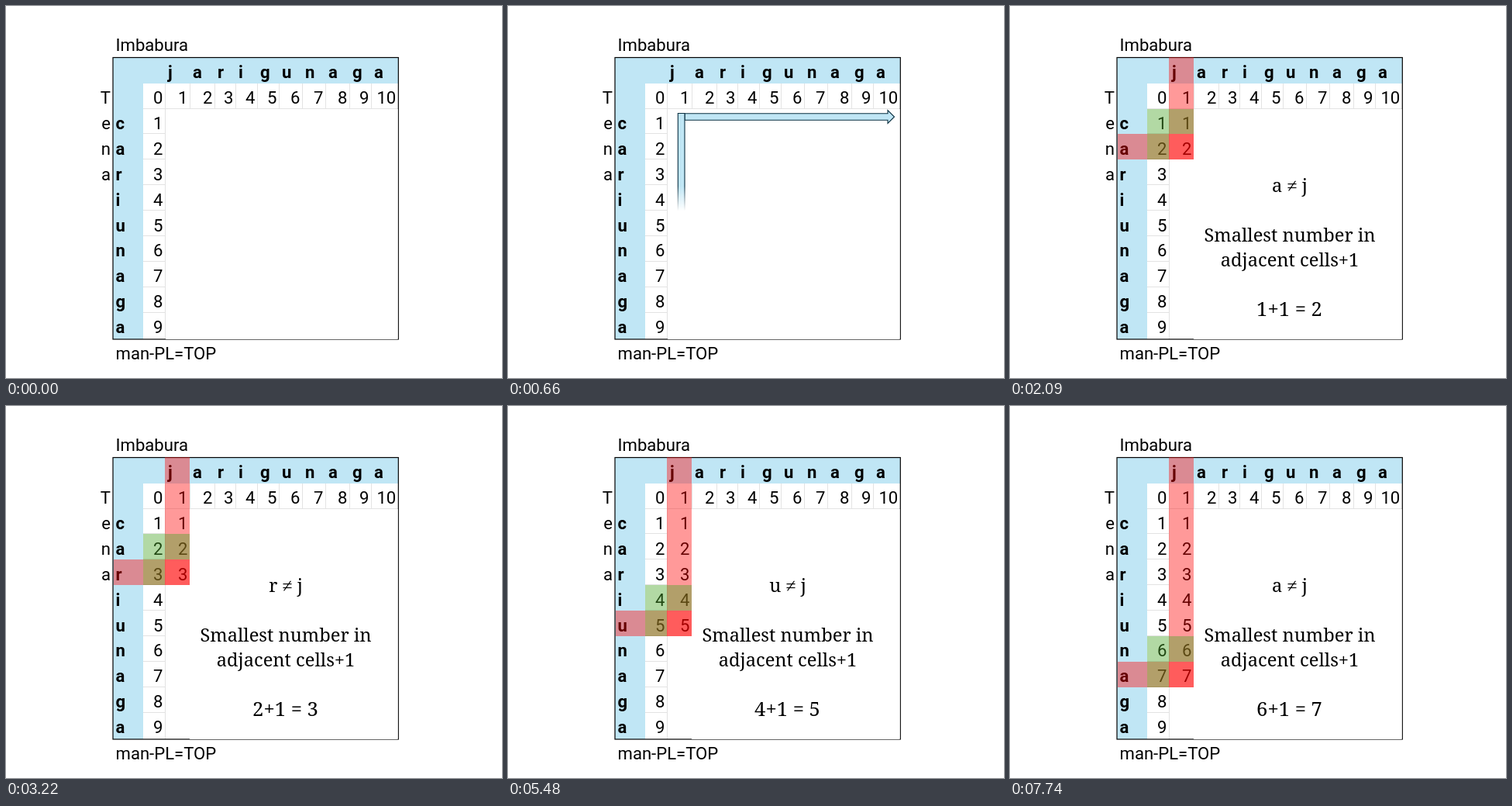
An HTML page that plays this animation: 640x480 px, repeating every 8 s.

```html
<!DOCTYPE html>
<html lang="en">
<head>
<meta charset="utf-8">
<title>Edit distance table</title>
<style>
  html, body { margin: 0; width: 100%; height: 100%; overflow: hidden; background: #fff; }
  svg { display: block; width: 640px; height: 480px; }
  text { font: 22.1px Roboto, sans-serif; fill: #000; white-space: pre; }
  .bold { font-weight: 700; }
  .end { text-anchor: end; }
  .note { font: 23.7px "Noto Serif", serif; text-anchor: middle; }
  .sum { font-size: 25.6px; }
  .sign { font-family: "Liberation Serif", serif; }
  .arrow { fill: #c0e6f5; stroke: #0b3041; stroke-width: 1.1; }
</style>
</head>
<body>
<svg id="stage" viewBox="0 0 640 480">
  <defs>
    <linearGradient id="fadeX" gradientUnits="userSpaceOnUse" y1="0" y2="0">
      <stop offset="0" stop-color="#fff"/><stop offset="1" stop-color="#fff" stop-opacity="0"/>
    </linearGradient>
    <linearGradient id="fadeY" gradientUnits="userSpaceOnUse" x1="0" x2="0">
      <stop offset="0" stop-color="#fff"/><stop offset="1" stop-color="#fff" stop-opacity="0"/>
    </linearGradient>
    <mask id="wipeX" maskUnits="userSpaceOnUse" x="0" y="0" width="640" height="480">
      <rect width="640" height="480" fill="url(#fadeX)"/>
    </mask>
    <mask id="wipeY" maskUnits="userSpaceOnUse" x="0" y="0" width="640" height="480">
      <rect width="640" height="480" fill="url(#fadeY)"/>
    </mask>
  </defs>
  <rect width="640" height="480" fill="#fff"/>
  <g id="table"></g>
  <path id="cover" fill="#fff"/>
  <g id="arrows">
    <path class="arrow" mask="url(#wipeX)" d="M228 138.7H490V134.5L498.5 143L490 151.5V147.2H228Z"/>
    <path class="arrow" mask="url(#wipeY)" d="M219.3 138.5H228V414.5H232.3L223.7 423L215 414.5H219.3Z"/>
  </g>
  <g id="lesson">
    <g id="values"></g>
    <path id="redCol" fill="#f00" fill-opacity=".4"/>
    <path id="redRow" fill="#f00" fill-opacity=".4"/>
    <path id="green" fill="#4ea72e" fill-opacity=".43"/>
    <text class="note" x="361" y="240"><tspan id="letter"></tspan> <tspan class="sign">≠</tspan> j</text>
    <text class="note" x="361" y="304">Smallest number in</text>
    <text class="note" x="361" y="336">adjacent cells+1</text>
    <text id="sum" class="note sum" x="360.5" y="400"></text>
  </g>
</svg>
<script>
const LOOP = 8000, STEP = 60, LESSON = 960, HOLD = 1130;
const SOFT = 32, WIPE = 7.4;
const across = "jarigunaga", down = "cariunaga", side = "Tena";
const cols = [177, 205, 237, 269, 296, 324, 352, 382, 412, 443, 471, 506];
const $ = id => document.getElementById(id);
const rowTop = r => Math.floor(100.15 + 32.9 * r);
const baseline = r => 126 + 32.9 * r;

function add(parent, tag, attrs, text) {
  const el = document.createElementNS("http://www.w3.org/2000/svg", tag);
  for (const key in attrs) el.setAttribute(key, attrs[key]);
  if (text !== undefined) el.textContent = text;
  $(parent).appendChild(el);
  return el;
}
const label = (parent, x, y, text, cls = "") => add(parent, "text", { x, y, class: cls }, text);

function buildTable() {
  add("table", "path", { d: "M138 66H506V100H177V430H138Z", fill: "#c0e6f5" });

  let grid = "M205.5 132V430M205 132.5H506";
  cols.slice(1, -1).forEach(x => grid += `M${x + .5} 100V132`);
  for (let r = 1; r < 10; r++) grid += `M177 ${rowTop(r) - .5}H205`;
  add("table", "path", { d: grid, stroke: "#e3e3e3", fill: "none" });
  add("table", "rect", { x: 138, y: 66.5, width: 368.3, height: 363.5, fill: "none", stroke: "#000", "stroke-width": 1.2 });

  label("table", 141.5, 58, "Imbabura");
  label("table", 141.5, 456, "man-PL=TOP");
  [...across].forEach((c, i) => label("table", cols[i + 1] + 4, 92.5, c, "bold"));
  [...down].forEach((c, i) => label("table", 141.5, baseline(i + 1), c, "bold"));
  [...side].forEach((c, i) => label("table", 135, baseline(i), c, "end"));
  for (let n = 0; n <= 10; n++) label("table", cols[n + 1] - 2.7, baseline(0), n, "end");
  for (let n = 1; n <= 9; n++) label("table", 202.3, baseline(n), n, "end");
}

function setWipe(id, axis, from, to, progress) {
  const p = Math.max(0, Math.min(1, progress));
  const lead = from + (to - from + SOFT) * p;
  $(id).setAttribute(axis + "1", lead - SOFT);
  $(id).setAttribute(axis + "2", lead);
}

function drawArrows(t) {
  const k = Math.floor(t / STEP);
  $("arrows").style.display = k ? "" : "none";
  setWipe("fadeX", "x", 219, 499, (k - .6) / WIPE);
  // The last step always shows both arrows in full.
  setWipe("fadeY", "y", 138, 423, k > 14 ? 1 : (k - 8.05) / WIPE);
}

function drawLesson(t) {
  const n = 1 + Math.floor((t - LESSON) / HOLD);
  const above = rowTop(n - 1), top = rowTop(n), bottom = rowTop(n + 1);
  $("redCol").setAttribute("d", `M205 66H237V${bottom}H205Z`);
  $("redRow").setAttribute("d", `M139 ${top}H237V${bottom}H139Z`);
  $("green").setAttribute("d", `M177 ${above}H237V${top}H205V${bottom}H177Z`);
  values.forEach((el, i) => el.style.display = i < n ? "" : "none");
  $("letter").textContent = down[n - 1];
  $("sum").textContent = `${n - 1}+1 = ${n}`;
}

function draw(t) {
  const teaching = t >= LESSON;
  $("lesson").style.display = teaching ? "" : "none";
  // The white cover hides the cells not yet filled in.
  $("cover").setAttribute("d", `M${teaching ? 237 : 206} 133H505.5V430H${teaching ? 237 : 206}Z`);
  if (teaching) {
    $("arrows").style.display = "none";
    drawLesson(t);
  } else drawArrows(t);
}

buildTable();
const values = [1, 2, 3, 4, 5, 6, 7].map(n => label("values", 234.3, baseline(n), n, "end"));

let start;
function tick(now) {
  start ??= now;
  draw((now - start) % LOOP);
  requestAnimationFrame(tick);
}
draw(0);
requestAnimationFrame(tick);
</script>
</body>
</html>
```
